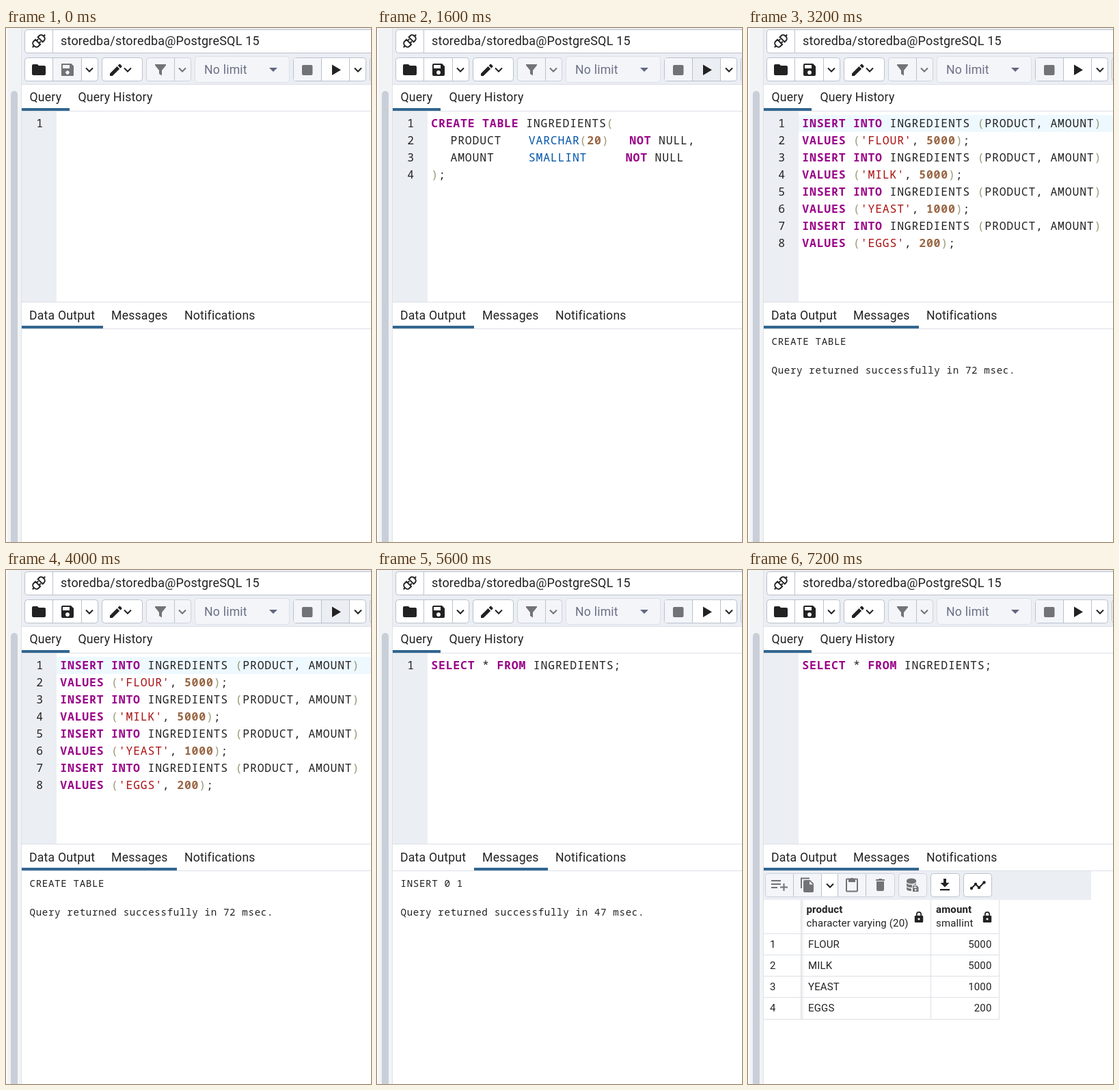
An HTML page that plays this animation: 534x751 px, repeating every 8.8 s.

```html
<!DOCTYPE html>
<html lang="en">
<head>
<meta charset="utf-8">
<title>Query tool</title>
<style>
html, body { margin: 0; width: 100%; height: 100%; overflow: hidden; background: #fff; }
svg { display: block; }
text { white-space: pre; fill: #222; }
.ui { font: 17.7px Roboto, sans-serif; letter-spacing: .19px; }
.cell { font: 15px Roboto, sans-serif; letter-spacing: .16px; }
.code { font: 16.5px "Noto Sans Mono", monospace; letter-spacing: .78px; }
.msg { font: 14.2px "Noto Sans Mono", monospace; letter-spacing: .63px; }
.kw { fill: #908; font-weight: bold; }
.num { fill: #964; font-weight: bold; }
.type { fill: #05a; }
.str { fill: #a11; }
.br { fill: #997; }
.end { text-anchor: end; }
.bar { fill: #ebeef3; }
.accent { fill: #326690; }
.btn { fill: #fff; stroke: #bac1cd; }
.off { fill: #f3f5f9; stroke: #cdd2dc; }
.dull { fill: #f3f5f9; }
.rule { fill: none; stroke: #dde0e6; }
.div { fill: none; stroke: #bac1cd; }
.dark { fill: #222; }
.grey { fill: #727377; }
.line { fill: none; stroke: #222; stroke-width: 2; }
.line.soft { stroke: #727377; }

/* One step lasts 800 ms, an eleventh of the loop. */
.step { animation: 8.8s step-end infinite; }
.blank { animation-name: blank; }
.create { animation-name: create; }
.insert { animation-name: insert; }
.select { animation-name: select; }
.hover { animation-name: hover; }
.created { animation-name: created; }
.inserted { animation-name: inserted; }
.result { animation-name: result; }
.data { animation-name: data; }
.messages { animation-name: messages; }
.first { animation-name: first; }
.few { animation-name: few; }
@keyframes blank { 0% { visibility: visible } 9.0909%, 100% { visibility: hidden } }
@keyframes create { 0%, 36.3636%, 100% { visibility: hidden } 9.0909% { visibility: visible } }
@keyframes insert { 0%, 63.6363%, 100% { visibility: hidden } 36.3636% { visibility: visible } }
@keyframes select { 0% { visibility: hidden } 63.6363%, 100% { visibility: visible } }
@keyframes hover {
  0%, 27.2727%, 54.5454%, 81.8181%, 100% { visibility: hidden }
  18.1818%, 45.4545%, 72.7272% { visibility: visible }
}
@keyframes created { 0%, 54.5454%, 100% { visibility: hidden } 27.2727% { visibility: visible } }
@keyframes inserted { 0%, 81.8181%, 100% { visibility: hidden } 54.5454% { visibility: visible } }
@keyframes result { 0% { visibility: hidden } 81.8181%, 100% { visibility: visible } }
@keyframes data { 0%, 81.8181%, 100% { visibility: visible } 54.5454% { visibility: hidden } }
@keyframes messages { 0% { visibility: hidden } 27.2727%, 100% { visibility: visible } }
@keyframes first { 0% { visibility: visible } 81.8181%, 100% { visibility: hidden } }
@keyframes few { 0%, 63.6363%, 100% { visibility: hidden } 9.0909% { visibility: visible } }
</style>
</head>
<body>
<svg width="534" height="751" viewBox="0 0 534 751">
  <defs>
    <path id="chevron" class="line" d="M-5-2.5 0 2.5 5-2.5"/>
    <path id="disk" fill-rule="evenodd" d="M83 52h12l4 4v12q0 2-2 2H83q-2 0-2-2V54q0-2 2-2zM83 54v5h10v-5zM90 62a3 3 0 1 0 .01 0z"/>
    <path id="lock" class="dark" fill-rule="evenodd" d="M-4-2V-4a4 4 0 0 1 8 0v2h1q1.200 0 1.200 1.200v7.600q0 1.200-1.200 1.200H-5q-1.200 0-1.200-1.200v-7.600Q-6.200-2-5-2zM-2.300-2H2.300V-4a2.300 2.300 0 0 0-4.600 0zM0 1.400a1.600 1.600 0 1 0 .01 0z"/>
    <text id="into" class="code" x="79.300" y="145"><tspan class="kw">INSERT INTO</tspan> INGREDIENTS <tspan class="br">(</tspan>PRODUCT, AMOUNT<tspan class="br">)</tspan></text>
    <linearGradient id="shade"><stop stop-color="#000" stop-opacity=".08"/><stop offset="1" stop-color="#000" stop-opacity="0"/></linearGradient>
  </defs>

  <!-- Side scrollbar -->
  <path fill="#f2f3f5" d="M2 0h20v751H2z"/>
  <rect x="7" y="92" width="10" height="680" rx="5" fill="#c9cfd9"/>
  <path class="rule" d="M22.500 0v751"/>

  <!-- Connection bar -->
  <path class="bar" d="M23 0h511v82H23z"/>
  <rect class="btn" x="27.500" y="2.500" width="540" height="34" rx="4"/>
  <path class="div" d="M68.500 3v33"/>
  <g transform="translate(48 19) rotate(-45)" class="line">
    <path d="M-13 0h3M10 0h3M-2-5h-4a4 5 0 0 0 0 10h4zM3-5h3a4 5 0 0 1 0 10H3zM-2-2.500h3.500M-2 2.500h3.500"/>
  </g>
  <text class="ui" x="80" y="25" style="font-size:18px">storedba/storedba@PostgreSQL 15</text>

  <!-- Toolbar -->
  <rect class="btn" x="27.500" y="43.500" width="107" height="34" rx="4"/>
  <path class="dull step blank" d="M69 44h41v33H69z"/>
  <path class="div" d="M68.500 44v33M110.500 44v33"/>
  <path class="dark" d="M40 53h6l2 2h8q2 0 2 2v10q0 2-2 2H40q-2 0-2-2V55q0-2 2-2z"/>
  <use href="#disk" class="dark"/>
  <use href="#disk" class="grey step blank"/>
  <use href="#chevron" x="122" y="61"/>
  <rect class="btn" x="140.500" y="43.500" width="59" height="34" rx="4"/>
  <path class="dark" d="M152 66.500 162.500 56l3.700 3.700L155.700 70H152zM163.600 54.900l1.900-1.900q.8-.8 1.600 0l2.200 2.200q.8.800 0 1.600l-1.900 1.900z"/>
  <use href="#chevron" x="178" y="61"/>
  <rect class="off" x="205.500" y="43.500" width="65" height="34" rx="4"/>
  <path class="div" d="M246.500 44v33"/>
  <path class="grey" d="M218 53h16v1.500l-6 7.500v7.500l-4-2.500v-5l-6-7.500z"/>
  <path class="line soft" d="m253 58.500 5 5 5-5"/>
  <rect class="off" x="276.500" y="41.500" width="138" height="38" rx="4" style="stroke:#dde0e6"/>
  <text class="ui" x="290" y="67" style="fill:#6b7085">No limit</text>
  <path fill="#626880" d="M385 58h12l-6 6z"/>
  <rect class="btn" x="420.500" y="43.500" width="106" height="34" rx="4"/>
  <path class="dull" d="M421 46q0-2 2-2h38v33h-38q-2 0-2-2z"/>
  <path class="bar step hover" d="M462 44h40v33h-40z"/>
  <path class="div" d="M461.500 44v33M502.500 44v33"/>
  <rect class="grey" x="433" y="54" width="15.500" height="15" rx="2"/>
  <path class="dark" d="M477 53.500 490 61.200 477 69z"/>
  <use href="#chevron" x="515" y="61"/>
  <rect class="btn" x="532.500" y="43.500" width="40" height="34" rx="4"/>

  <!-- Tabs and editor -->
  <path class="rule" d="M23 82.500h511M23 121.500h511M23 400.500h511M23 439.500h511"/>
  <path class="bar" d="M23 122h51v278H23z"/>
  <path class="accent" d="M23 117h70v4H23z"/>
  <g class="ui">
    <text x="34.500" y="107">Query</text>
    <text x="105.500" y="107">Query History</text>
    <text x="34" y="426">Data Output</text>
    <text x="154" y="426">Messages</text>
    <text x="261" y="426">Notifications</text>
  </g>
  <path class="accent step data" d="M23 435h119v4H23z"/>
  <path class="accent step messages" d="M142 435h108v4H142z"/>

  <g class="code">
    <text class="step first" x="44.300" y="145">1</text>
    <g class="step few">
      <text x="44.300" y="170">2</text>
      <text x="44.300" y="195">3</text>
      <text x="44.300" y="220">4</text>
    </g>

    <g class="step create">
      <text x="79.300" y="145"><tspan class="kw">CREATE TABLE</tspan> INGREDIENTS<tspan class="br">(</tspan></text>
      <text x="107.500" y="170">PRODUCT</text>
      <text x="221.800" y="170"><tspan class="type">VARCHAR</tspan><tspan class="br">(</tspan><tspan class="num">20</tspan><tspan class="br">)</tspan></text>
      <text x="369.300" y="170"><tspan class="kw">NOT</tspan> NULL,</text>
      <text x="107.500" y="195">AMOUNT</text>
      <text class="type" x="221.800" y="195">SMALLINT</text>
      <text x="363.800" y="195"><tspan class="kw">NOT</tspan> NULL</text>
      <text x="79.300" y="220"><tspan class="br">)</tspan>;</text>
    </g>

    <g class="step insert">
      <path fill="#edf8ff" d="M74 127h460v25H74z"/>
      <text x="44.300" y="245">5</text>
      <text x="44.300" y="270">6</text>
      <text x="44.300" y="295">7</text>
      <text x="44.300" y="320">8</text>
      <use href="#into"/>
      <text x="79.300" y="170"><tspan class="kw">VALUES</tspan> <tspan class="br">(</tspan><tspan class="str">'FLOUR'</tspan>, <tspan class="num">5000</tspan><tspan class="br">)</tspan>;</text>
      <use href="#into" y="50"/>
      <text x="79.300" y="220"><tspan class="kw">VALUES</tspan> <tspan class="br">(</tspan><tspan class="str">'MILK'</tspan>, <tspan class="num">5000</tspan><tspan class="br">)</tspan>;</text>
      <use href="#into" y="100"/>
      <text x="79.300" y="270"><tspan class="kw">VALUES</tspan> <tspan class="br">(</tspan><tspan class="str">'YEAST'</tspan>, <tspan class="num">1000</tspan><tspan class="br">)</tspan>;</text>
      <use href="#into" y="150"/>
      <text x="79.300" y="320"><tspan class="kw">VALUES</tspan> <tspan class="br">(</tspan><tspan class="str">'EGGS'</tspan>, <tspan class="num">200</tspan><tspan class="br">)</tspan>;</text>
    </g>

    <text class="step select" x="79.300" y="145"><tspan class="kw">SELECT</tspan> * <tspan class="kw">FROM</tspan> INGREDIENTS;</text>
  </g>

  <!-- Messages -->
  <g class="msg step created">
    <text x="34.500" y="463">CREATE TABLE</text>
    <text x="34.500" y="505">Query returned successfully in 72 msec.</text>
  </g>
  <g class="msg step inserted">
    <text x="34.500" y="463">INSERT 0 1</text>
    <text x="34.500" y="505">Query returned successfully in 47 msec.</text>
  </g>

  <!-- Result grid -->
  <g class="step result">
    <path class="bar" d="M23 440h479v42H23z"/>
    <rect class="off" x="25.500" y="443.500" width="189" height="34" rx="4"/>
    <path fill="#fff" d="M108 444h23v33h-23z"/>
    <path class="div" d="M66.500 444v33M107.500 444v33M131.500 444v33M172.500 444v33"/>
    <path class="line soft" d="M34 454h14M34 459h14M34 464h9M52.500 458v11M47 463.500h11"/>
    <path class="line soft" d="M78 465V450.500h12"/>
    <path class="grey" fill-rule="evenodd" d="M83 453h8l5 5v11q0 2-2 2H83q-2 0-2-2v-14q0-2 2-2zM90 454.500v5h5z"/>
    <use href="#chevron" x="120" y="461"/>
    <path class="line soft" d="M145 451.500h14q1 0 1 1v16q0 1-1 1h-14q-1 0-1-1v-16q0-1 1-1z"/>
    <path class="grey" d="M147 451h3a2.200 2.200 0 0 1 4 0h3v5h-10z"/>
    <path class="grey" d="M187 452h3.500l1-1h4l1 1h3.500v2h-13zM188 455h11v12q0 2-2 2h-7q-2 0-2-2z"/>
    <rect class="off" x="220.500" y="443.500" width="41" height="34" rx="4"/>
    <path class="grey" d="M232 453.500a7 3 0 0 1 14 0v2a7 3 0 0 1-14 0zM232 457.500q2 2.500 7 2.500 5 0 7-2.500v2.500h-6v4q-8 0-8-3zM232 463q2 2.500 7 2.500v3.500q-7 0-7-3z"/>
    <path class="grey" fill-rule="evenodd" d="M241 461h6l2.500 2.500v6.500h-8.500zM242.500 462.500v2h4v-2zM245.200 466a1.400 1.400 0 1 0 .01 0z"/>
    <rect class="btn" x="267.500" y="443.500" width="42" height="34" rx="4"/>
    <path class="dark" d="M286 451h4v6h4.500l-6.500 6.500-6.500-6.500h4.500zM281 466h14v2.200h-14z"/>
    <rect class="btn" x="315.500" y="443.500" width="41" height="34" rx="4"/>
    <path class="line" d="m327 465 6-6 5 5 8-8"/>
    <g class="dark"><circle cx="327" cy="465" r="2.200"/><circle cx="333" cy="459" r="2.200"/><circle cx="338" cy="464" r="2.200"/><circle cx="345.500" cy="456.500" r="2.200"/></g>

    <path fill="#fff" d="M23 482h345v174H23z"/>
    <path fill="url(#shade)" d="M78 482h5v174h-5z"/>
    <path class="rule" d="M23 531.500h345M23 562.500h345M23 593.500h345M23 624.500h345M23 656.500h345M77.500 482v174M267.500 482v174M367.500 482v174"/>
    <g class="cell">
      <text x="85.500" y="501" font-weight="600">product</text>
      <text x="85.500" y="521">character varying (20)</text>
      <text x="275" y="501" font-weight="600">amount</text>
      <text x="275" y="521">smallint</text>
      <text x="32" y="552">1</text><text x="88" y="552">FLOUR</text><text class="end" x="356.500" y="552">5000</text>
      <text x="32" y="583">2</text><text x="88" y="583">MILK</text><text class="end" x="356.500" y="583">5000</text>
      <text x="32" y="614">3</text><text x="88" y="614">YEAST</text><text class="end" x="356.500" y="614">1000</text>
      <text x="32" y="645">4</text><text x="88" y="645">EGGS</text><text class="end" x="356.500" y="645">200</text>
    </g>
    <use href="#lock" x="250" y="507"/>
    <use href="#lock" x="350" y="507"/>
  </g>
</svg>
</body>
</html>
```
